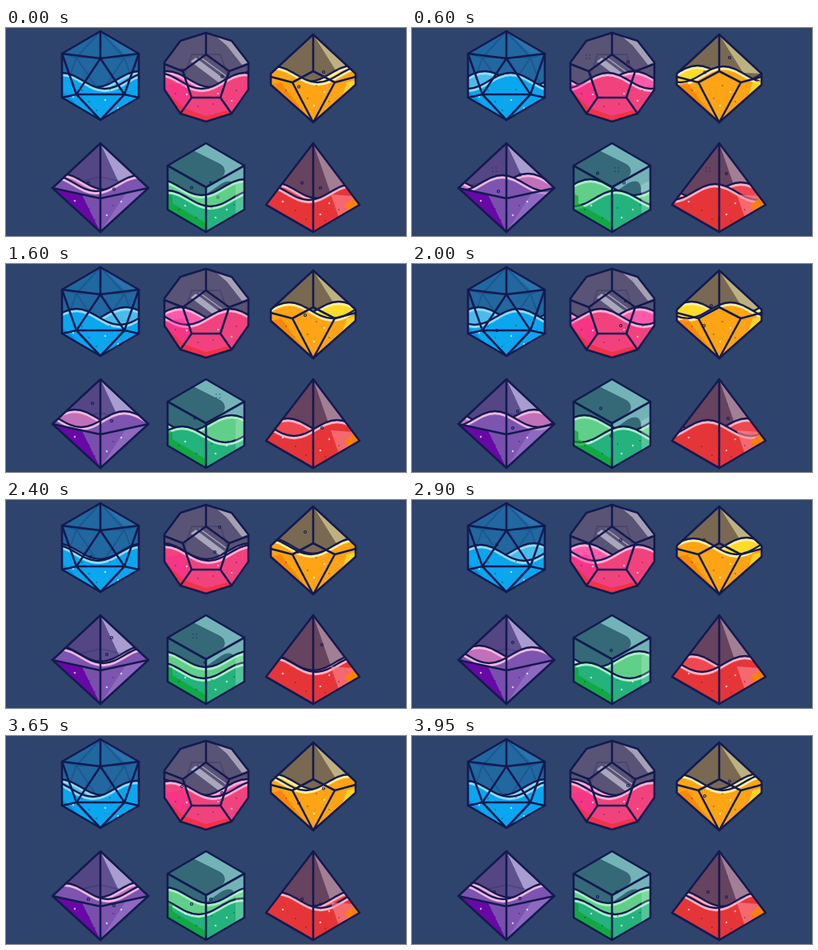
An HTML page without scripts that plays this animation: 500 px wide and 260 px high, repeating every 4 s.

```html
<!DOCTYPE html>
<html lang="en">
<head>
<meta charset="utf-8">
<title>Potion dice</title>
<style>
html, body { margin: 0; width: 100%; height: 100%; overflow: hidden; background: #2f446c; }
svg { display: block; width: 100vw; height: 100vh; }
.edge { fill: none; stroke: #131a50; stroke-width: 2.6; stroke-linejoin: round; stroke-linecap: round; }
.faint { fill: none; stroke: #131a50; stroke-width: 2; opacity: .2; }
.ink { fill: none; stroke: #131a50; stroke-width: 2.4; }
.front, .back { stroke-width: 3.4; animation: front calc(4s / 3) linear infinite; }
.back { animation-name: back; }
.specks { fill: none; stroke: #fff; stroke-width: 2.6; stroke-linecap: round; opacity: .65; }
.motes { fill: none; stroke: #131a50; stroke-width: 1.5; stroke-linecap: round; opacity: .75; }

/* crest position across one die */
@keyframes front {
  0% { transform: translateX(-48.6px); }
  20% { transform: translateX(-30px); }
  45% { transform: translateX(5px); }
  51% { transform: translateX(16px); }
  78% { transform: translateX(50px); }
  100% { transform: translateX(59.4px); }
}
@keyframes back {
  0% { transform: translateX(48.6px); }
  20% { transform: translateX(32px); }
  45% { transform: translateX(-27px); }
  51% { transform: translateX(-36px); }
  78% { transform: translateX(-54px); }
  100% { transform: translateX(-59.4px); }
}

/* --t is the moment a bubble bursts */
.bubble > * { animation: rise 4s linear infinite; animation-delay: calc(var(--t) - 5.65s); }
.bubble > .pop { animation-name: pop; }
.bubble circle { fill: none; stroke: #131a50; stroke-width: 1.1; }
.pop { fill: none; stroke: #131a50; stroke-width: 1.5; stroke-linecap: round; }
@keyframes rise {
  0% { transform: translateY(48px); opacity: 0; }
  3% { opacity: 1; }
  40% { transform: none; opacity: 1; }
  40.01%, 100% { transform: none; opacity: 0; }
}
@keyframes pop {
  0%, 39.99% { opacity: 0; }
  40% { opacity: 1; transform: scale(.7); }
  43.7% { opacity: 1; transform: scale(1.1); }
  43.71%, 100% { opacity: 0; }
}
</style>
</head>
<body>
<svg viewBox="0 0 500 260">
<defs>
  <path id="line" d="M-270 10c20 0 34-20 54-20s34 20 54 20 34-20 54-20 34 20 54 20 34-20 54-20 34 20 54 20 34-20 54-20 34 20 54 20 34-20 54-20 34 20 54 20"/>
  <g id="wave">
    <path stroke="none" d="M-270 10c20 0 34-20 54-20s34 20 54 20 34-20 54-20 34 20 54 20 34-20 54-20 34 20 54 20 34-20 54-20 34 20 54 20 34-20 54-20 34 20 54 20V90H-270z"/>
    <use href="#line" y="2.6" fill="none"/>
    <use href="#line" class="ink"/>
  </g>
  <path id="burst" d="M-2.6-2.6h0M2.6-2.6h0M-2.6 2.6h0M2.6 2.6h0"/>
  <path id="d20" d="M118 4 166 32V87L118 115 70 87V32z"/>
  <path id="d12" d="M250 6 282 16 303 43V77L282 107 250 117 218 107 198 77V43L218 16z"/>
  <path id="d10" d="M384 8 437 57V71L384 118 331 71V57z"/>
  <path id="d8" d="M118 144 178 200 118 255 58 200z"/>
  <path id="d6" d="M250 144 298 172V227L250 255 202 227V172z"/>
  <path id="d4" d="M384 144 442 221 384 255 325 221z"/>
  <clipPath id="c20"><use href="#d20"/></clipPath>
  <clipPath id="c12"><use href="#d12"/></clipPath>
  <clipPath id="c10"><use href="#d10"/></clipPath>
  <clipPath id="c8"><use href="#d8"/></clipPath>
  <clipPath id="c6"><use href="#d6"/></clipPath>
  <clipPath id="c4"><use href="#d4"/></clipPath>
</defs>
<rect width="500" height="260" fill="#2f446c"/>

<!-- blue -->
<g clip-path="url(#c20)">
  <use href="#d20" fill="#2167a0"/>
  <path fill="#2a73ab" d="M118 4 166 32 150 34z"/>
  <path class="faint" d="M118 82 88 37H148zM70 32 88 37 118 4 148 37 166 32M70 87 88 37M166 87 148 37"/>
  <g stroke="#8fdcf8">
    <g transform="translate(118 64)"><g class="back" fill="#4abcec"><use href="#wave"/></g></g>
    <g transform="translate(118 66)"><g class="front" fill="#0aa6ee"><use href="#wave"/></g></g>
  </g>
  <path fill="#0672d8" opacity=".5" d="M70 80 78 85 92 100 118 115 70 87z"/>
  <path class="specks" d="M84 86h0M124 90h0M140 100h0"/>
  <path class="motes" d="M104 92h0M130 77h0M95 78h0M113 103h0"/>
</g>
<use href="#d20" class="edge"/>
<path class="edge" d="M118 4V38L70 32 88 83 118 38 148 83 166 32 118 38M70 87 88 83H148L166 87M88 83 118 115 148 83"/>

<!-- pink -->
<g clip-path="url(#c12)">
  <use href="#d12" fill="#595376"/>
  <path fill="#a6a0b5" d="M262 10 282 16 303 43 295 46 276 22z"/>
  <path class="faint" d="M250 87 221 66 232 33H268L279 66z"/>
  <path fill="#aaa6bc" d="M231 42 237 37 273 64 267 69z"/>
  <path fill="none" stroke="#aaa6bc" stroke-width="1.5" d="M242 36 275 60"/>
  <g stroke="#ffb0d6">
    <g transform="translate(250 64) scale(-1 1)"><g class="back" fill="#ff5aaa"><use href="#wave"/></g></g>
    <g transform="translate(250 66) scale(-1 1)"><g class="front" fill="#f2427e"><use href="#wave"/></g></g>
  </g>
  <path fill="#f4303f" opacity=".85" d="M198 77 218 107 250 117 282 107 276 103 250 110 222 100z"/>
  <path fill="#ff1e92" opacity=".35" d="M198 72 221 68 232 87 222 100 198 77z"/>
  <path class="specks" d="M226 83h0M265 82h0M282 91h0"/>
  <path class="motes" d="M212 82h0M240 98h0M259 95h0M288 78h0"/>
</g>
<use href="#d12" class="edge"/>
<path class="edge" d="M250 6V33L279 54 268 87H232L221 54 250 33M279 54 303 45M268 87 282 107M232 87 218 107M221 54 198 45"/>

<!-- yellow -->
<g clip-path="url(#c10)">
  <use href="#d10" fill="#796952"/>
  <path fill="#bdb27f" d="M384 8 437 57 414 56z"/>
  <path class="faint" d="M331 71 358 59 384 78 411 59 437 71"/>
  <g stroke="#fff0a2">
    <g transform="translate(384 57)"><g class="back" fill="#ffdc28"><use href="#wave"/></g></g>
    <g transform="translate(384 58)"><g class="front" fill="#ffa414"><use href="#wave"/></g></g>
  </g>
  <path fill="#ff7c00" opacity=".75" d="M331 71 344 68 360 90 384 118z"/>
  <path fill="#ffe028" opacity=".8" d="M437 65 426 68 420 86 437 71z"/>
  <path class="specks" d="M366 82h0M398 80h0M385 97h0"/>
  <path class="motes" d="M350 78h0M377 88h0M404 92h0M388 72h0"/>
</g>
<use href="#d10" class="edge"/>
<path class="edge" d="M384 8V54L358 68 331 61M384 54 411 68 437 61M358 68 384 118 411 68"/>

<!-- violet -->
<g clip-path="url(#c8)">
  <use href="#d8" fill="#544685"/>
  <path fill="#5f5090" d="M118 144 178 200 118 213z"/>
  <path fill="#a99cd0" d="M118 144 178 200 147 206z"/>
  <path class="faint" d="M58 200 118 186 178 200"/>
  <g stroke="#f0b8de">
    <g transform="translate(118 192) scale(-1 1)"><g class="back" fill="#c270ba"><use href="#wave"/></g></g>
    <g transform="translate(118 194) scale(-1 1)"><g class="front" fill="#7d54b0"><use href="#wave"/></g></g>
  </g>
  <path fill="#6808a6" d="M58 200 95 208 118 255z"/>
  <path fill="#7850ab" d="M95 208 118 213V255z"/>
  <path fill="#9a78cc" opacity=".6" d="M178 200 150 206 118 255z"/>
  <path class="specks" d="M86 216h0M126 234h0M144 217h0"/>
  <path class="motes" d="M104 226h0M134 222h0M111 240h0"/>
</g>
<use href="#d8" class="edge"/>
<path class="edge" d="M118 144V255M58 200 118 213 178 200"/>

<!-- green -->
<g clip-path="url(#c6)">
  <use href="#d6" fill="#356978"/>
  <path fill="#73b3b8" d="M234 153 250 144 298 172V227H250V199L267 188Q276 183 273 176 272 172 266 169z"/>
  <path fill="#356978" d="M250 208 270 194Q285 187 286 200V227H250z"/>
  <g stroke="#a9efc6">
    <g transform="translate(250 199)"><g class="back" fill="#60cf89"><use href="#wave"/></g></g>
    <g transform="translate(250 213)"><g class="front" fill="#24b27d"><use href="#wave"/></g></g>
  </g>
  <path fill="#0aa52c" opacity=".7" d="M202 207 208 210V219L250 244V255L202 227z"/>
  <path fill="#d8ffe8" opacity=".25" d="M287 196 298 190V227L287 233z"/>
  <path class="specks" d="M224 222h0M276 227h0M262 237h0"/>
  <path class="motes" d="M216 227h0M238 237h0M285 221h0M257 225h0"/>
</g>
<use href="#d6" class="edge"/>
<path class="edge" d="M202 172 250 199 298 172M250 199V255"/>

<!-- red -->
<g clip-path="url(#c4)">
  <use href="#d4" fill="#66435f"/>
  <path fill="#a37f96" d="M384 144 442 221 416 236z"/>
  <g stroke="#ffb2c6">
    <g transform="translate(384 203) scale(-1 1)"><g class="back" fill="#f0484f"><use href="#wave"/></g></g>
    <g transform="translate(384 205) scale(-1 1)"><g class="front" fill="#e63538"><use href="#wave"/></g></g>
  </g>
  <path fill="#ff8a94" opacity=".6" d="M406 208 434 210 442 221 416 237z"/>
  <path fill="#ff7f0c" d="M435 212 442 221 428 230 423 222z"/>
  <path class="specks" d="M346 217h0M393 233h0M404 219h0"/>
  <path class="motes" d="M362 228h0M375 239h0M399 241h0M416 227h0"/>
</g>
<use href="#d4" class="edge"/>
<path class="edge" d="M384 144V255"/>

<!-- bubbles -->
<g class="bubble" style="--t:3.35s" transform="translate(106 44)"><circle r="1.5"/><use href="#burst" class="pop"/></g>
<g class="bubble" style="--t:.6s" transform="translate(220 36)"><circle r="1.5"/><use href="#burst" class="pop"/></g>
<g class="bubble" style="--t:1s" transform="translate(270 32)"><circle r="1.5"/><use href="#burst" class="pop"/></g>
<g class="bubble" style="--t:2.55s" transform="translate(267 31)"><circle r="1.5"/><use href="#burst" class="pop"/></g>
<g class="bubble" style="--t:3.35s" transform="translate(261 38)"><circle r="1.5"/><use href="#burst" class="pop"/></g>
<g class="bubble" style="--t:.75s" transform="translate(397 34)"><circle r="1.5"/><use href="#burst" class="pop"/></g>
<g class="bubble" style="--t:1.2s" transform="translate(366 39)"><circle r="1.5"/><use href="#burst" class="pop"/></g>
<g class="bubble" style="--t:2.55s" transform="translate(374 37)"><circle r="1.5"/><use href="#burst" class="pop"/></g>
<g class="bubble" style="--t:3.35s" transform="translate(365 38)"><circle r="1.5"/><use href="#burst" class="pop"/></g>
<g class="bubble" style="--t:.6s" transform="translate(103 177)"><circle r="1.5"/><use href="#burst" class="pop"/></g>
<g class="bubble" style="--t:1s" transform="translate(135 173)"><circle r="1.5"/><use href="#burst" class="pop"/></g>
<g class="bubble" style="--t:1.72s" transform="translate(108 172)"><circle r="1.5"/><use href="#burst" class="pop"/></g>
<g class="bubble" style="--t:2.52s" transform="translate(132 170)"><circle r="1.5"/><use href="#burst" class="pop"/></g>
<g class="bubble" style="--t:3.35s" transform="translate(126 166)"><circle r="1.5"/><use href="#burst" class="pop"/></g>
<g class="bubble" style="--t:.6s" transform="translate(256 177)"><circle r="1.5"/><use href="#burst" class="pop"/></g>
<g class="bubble" style="--t:1s" transform="translate(232 171)"><circle r="1.5"/><use href="#burst" class="pop"/></g>
<g class="bubble" style="--t:1.6s" transform="translate(265 165)"><circle r="1.5"/><use href="#burst" class="pop"/></g>
<g class="bubble" style="--t:2.4s" transform="translate(236 170)"><circle r="1.5"/><use href="#burst" class="pop"/></g>
<g class="bubble" style="--t:3.35s" transform="translate(249 176)"><circle r="1.5"/><use href="#burst" class="pop"/></g>
<g class="bubble" style="--t:.6s" transform="translate(370 177)"><circle r="1.5"/><use href="#burst" class="pop"/></g>
<g class="bubble" style="--t:.78s" transform="translate(393 178)"><circle r="1.5"/><use href="#burst" class="pop"/></g>
<g class="bubble" style="--t:2.55s" transform="translate(395 178)"><circle r="1.5"/><use href="#burst" class="pop"/></g>
</svg>
</body>
</html>
```
